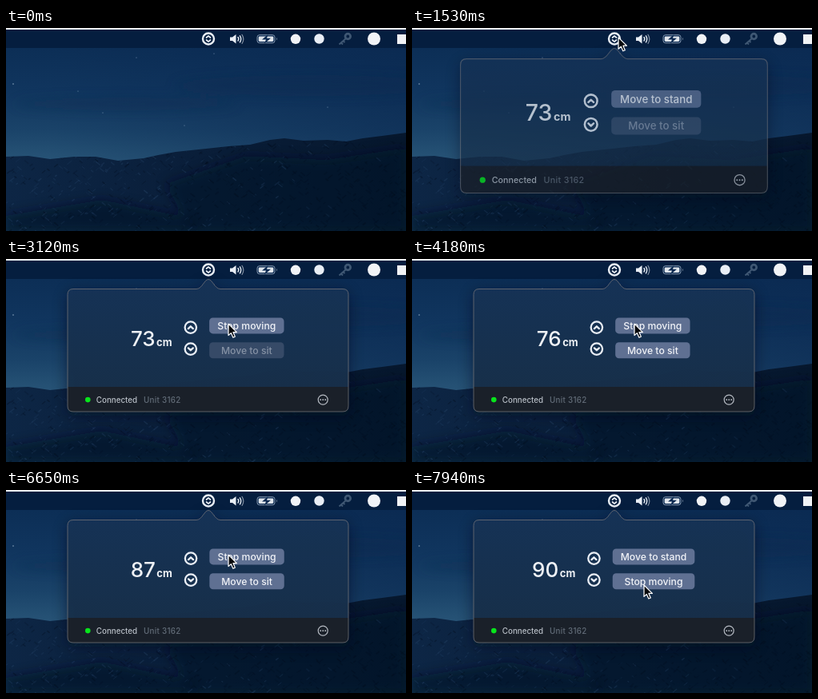
Write an HTML page that moves like this. It is 500x254 px and loops after 8000 ms.

```html
<!DOCTYPE html>
<html lang="en">
<head>
<meta charset="utf-8">
<title>Desk height control</title>
<style>
html, body { margin: 0; width: 100%; height: 100%; overflow: hidden; background: #071a35; }
svg { display: block; width: 500px; height: 254px; font-family: Inter, sans-serif; }
.line { fill: none; stroke: #e9eef5; stroke-linecap: round; stroke-linejoin: round; }
.label { font-size: 12.2px; font-weight: 500; text-anchor: middle; }
</style>
</head>
<body>
<svg viewBox="0 0 500 254">
  <defs>
    <linearGradient id="sky" x2="0" y2="1">
      <stop offset="0" stop-color="#0a2b52"/>
      <stop offset=".45" stop-color="#10355e"/>
      <stop offset=".75" stop-color="#1a4369"/>
      <stop offset="1" stop-color="#295678"/>
    </linearGradient>
    <linearGradient id="dusk">
      <stop offset=".1" stop-color="#0a2850" stop-opacity="0"/>
      <stop offset="1" stop-color="#0a2850" stop-opacity=".6"/>
    </linearGradient>
    <linearGradient id="hill">
      <stop offset="0" stop-color="#0d2645"/>
      <stop offset=".4" stop-color="#0a1f3b"/>
      <stop offset="1" stop-color="#06172d"/>
    </linearGradient>
    <linearGradient id="panel" x2="0" y2="1">
      <stop offset="0" stop-color="#163357"/>
      <stop offset="1" stop-color="#182f47"/>
    </linearGradient>
    <filter id="soft" x="-20%" y="-20%" width="140%" height="150%"><feGaussianBlur stdDeviation="9"/></filter>
    <filter id="haze" x="-20%" y="-80%" width="140%" height="260%"><feGaussianBlur stdDeviation="7"/></filter>
    <path id="ridge" d="M0 161L28 160 55 164 85 161 112 161 140 166 172 163 190 159 212 155 250 151 278 148 305 146 330 140 348 138 372 141 402 140 425 142 446 138 470 135 500 131V254H0Z"/>
    <clipPath id="land"><use href="#ridge"/></clipPath>
    <path id="shape" d="M84 37.5H238C245 37.5 248 25.5 253 25.5S261 37.5 268 37.5H421Q428 37.5 428 44.5V184Q428 191 421 191H84Q77 191 77 184V44.5Q77 37.5 84 37.5Z"/>
    <clipPath id="inside"><use href="#shape"/></clipPath>
  </defs>

  <rect width="500" height="170" fill="url(#sky)"/>
  <rect width="500" height="170" fill="url(#dusk)"/>
  <g filter="url(#haze)" fill="#0a2a50" opacity=".4">
    <ellipse cx="380" cy="72" rx="170" ry="13"/>
    <ellipse cx="150" cy="95" rx="140" ry="8"/>
  </g>
  <g id="stars" fill="#8fa8c2"></g>
  <use href="#ridge" fill="url(#hill)"/>
  <g clip-path="url(#land)">
    <g filter="url(#haze)" fill="#051326">
      <path d="M200 195L300 160 400 165 500 150V254H230Z" opacity=".55"/>
      <path d="M0 235L120 215 240 240V254H0Z" opacity=".6"/>
    </g>
    <g id="slopes" fill="none" stroke-linecap="round"></g>
  </g>
  <rect width="500" height="25" fill="#06214a"/>
  <rect width="500" height="25" fill="#041c38" opacity=".55"/>
  <rect width="500" height="2" fill="#eef0f2"/>

  <g id="menu">
    <circle class="line" cx="253" cy="13.5" r="7" stroke-width="2.4"/>
    <path class="line" d="M250.5 12L253 9.8 255.5 12M250.5 15L253 17.2 255.5 15" stroke-width="1.7"/>
    <path d="M280 11.5H283L287.5 8V19.5L283 16H280Z" fill="#e9eef5"/>
    <path class="line" d="M290 11.5Q291.6 13.8 290 16M292.4 9.8Q295 13.8 292.4 17.8" stroke-width="1.4"/>
    <path class="line" d="M295 8.3Q298.6 13.8 295 19.3" stroke-width="1.2" opacity=".55"/>
    <rect x="314" y="8.7" width="22" height="10" rx="2.8" fill="#0a2850" stroke="#8497ad"/>
    <rect x="315.7" y="10.4" width="18.6" height="6.6" rx="1.4" fill="#dfe5ec"/>
    <path d="M338 11.8Q339.8 13.7 338 15.6Z" fill="#8497ad"/>
    <path d="M327.5 8L320 14.4H325L323 19.5 331 12.8H326Z" fill="#0a2850"/>
    <circle cx="362" cy="13.8" r="6.2" fill="#f1f3f6"/>
    <circle cx="391.5" cy="13.5" r="6.2" fill="#e9eef5"/>
    <g fill="none" stroke="#3f5773" stroke-width="2">
      <circle cx="427.3" cy="10.5" r="3.3" stroke-width="2.8"/>
      <path d="M425 13L416.5 20.5M419 18.5L421 20.5M421.5 16.2L423.5 18"/>
    </g>
    <circle cx="460" cy="13.5" r="8" fill="#f1f3f6"/>
    <rect x="489" y="8" width="12" height="12" fill="#f1f3f6"/>
  </g>

  <g id="popup">
    <use href="#shape" y="5" fill="#020b1b" opacity=".55" filter="url(#soft)"/>
    <use href="#shape" fill="url(#panel)" fill-opacity=".96"/>
    <rect x="77" y="160" width="351" height="31" fill="#1a2029" clip-path="url(#inside)"/>
    <use href="#shape" fill="none" stroke="#77767a" stroke-opacity=".75"/>
    <g transform="translate(0 .6)">
      <text id="height" y="108" font-size="26" font-weight="500" fill="#eef1f5"></text>
      <g id="controls">
        <text x="-66" y="108" font-size="13" font-weight="700" fill="#eef1f5">cm</text>
        <g class="line" stroke-width="2.3">
          <circle cx="-23.3" cy="85" r="7.2"/><path d="M-26.3 86.5L-23.3 83.7-20.3 86.5"/>
          <circle cx="-23.3" cy="112" r="7.2"/><path d="M-26.3 110.8L-23.3 113.6-20.3 110.8"/>
        </g>
        <rect id="up" y="72.8" height="20" rx="4.5"/>
        <rect id="down" y="103.6" height="20" rx="4.5"/>
        <g class="label" fill="#f1f3f8">
          <text id="stand" y="87.2">Move to stand</text>
          <text id="stop" y="87.2">Stop moving</text>
          <text id="sit" y="118.1"></text>
        </g>
      </g>
      <circle cx="102.3" cy="175.5" r="3.3" fill="#08e51c"/>
      <g font-size="9.8" font-weight="500">
        <text x="112.8" y="179.2" fill="#b9bfc7">Connected</text>
        <text x="172" y="179.2" fill="#626c78" letter-spacing=".3">Unit 3162</text>
      </g>
      <circle class="line" cx="396.2" cy="175.5" r="6" stroke-width="1.2" opacity=".75"/>
      <path class="line" d="M393.2 175.5h.01M396.2 175.5h.01M399.2 175.5h.01" stroke-width="1.8" opacity=".85"/>
    </g>
  </g>
  <path id="cursor" d="M0 0V14.4L3.3 11.4 5.8 17 8.3 15.9 5.9 10.4H10.4Z" fill="#06080c" stroke="#fff" stroke-width="1.2" stroke-linejoin="round"/>
</svg>
<script>
const $ = id => document.getElementById(id);
const set = (id, attrs) => { for (const k in attrs) $(id).setAttribute(k, attrs[k]); };
const clamp = v => Math.max(0, Math.min(1, v));
const smooth = (a, b, t) => { const p = clamp((t - a) / (b - a)); return p * p * (3 - 2 * p); };

const LOOP = 8000, FPS = 17;
const CENTER = 251.7, GAP = 67.5, WIDE = 102.6, NARROW = 93.4;
// Times at which the height rises by one, starting from 73
const RISES = [3590, 3940, 4180, 4470, 4650, 4820, 5060, 5290, 5530, 5760,
  5940, 6180, 6410, 6650, 6880, 7120, 7300];
// Pointer stops: time, x, y
const POINTER = [[235, 351, 231], [880, 262, 9], [940, 261, 10.4], [1180, 258, 11.8],
  [1880, 258, 11.8], [2290, 283, 88], [2410, 278, 81.2], [7530, 278, 81.2], [7825, 290, 119]];

function buildScenery() {
  let seed = 11;
  const rnd = () => (seed = seed * 16807 % 2147483647) / 2147483647;
  $('stars').innerHTML = [[9, 70], [163, 37], [260, 32], [121, 106], [223, 122], [402, 99], [90, 79]]
    .map(([x, y], i) => `<circle cx="${x}" cy="${y}" r="${i ? .5 : .8}"/>`).join('');
  let marks = '';
  for (let i = 0; i < 900; i++) {
    const x = rnd() * 500, y = 140 + rnd() * 114, len = 1 + rnd() * 4;
    const light = rnd() < .6 - x / 900;
    const dir = rnd() < .5 ? 1 : -1;
    marks += `<path d="M${x} ${y}l${dir * len} ${len * .8}" stroke="${light ? '#29476b' : '#030d1c'}"
      stroke-width="${.8 + rnd()}" opacity="${.1 + rnd() * .3}"/>`;
  }
  $('slopes').innerHTML = marks;
}

function pointerAt(t) {
  let i = 0;
  while (i < POINTER.length - 2 && t >= POINTER[i + 1][0]) i++;
  const [t0, x0, y0] = POINTER[i], [t1, x1, y1] = POINTER[i + 1];
  const p = smooth(t0, t1, t);
  return [x0 + (x1 - x0) * p, y0 + (y1 - y0) * p];
}

function draw(t) {
  const open = clamp((t - 1382) / 265);
  const scale = 1 + .21 * (1 - open);
  set('popup', {
    opacity: Math.sqrt(open),
    transform: `translate(253 25) scale(${scale}) translate(-253 -25)`
  });

  const height = 73 + RISES.filter(r => t >= r - 5).length;
  const moving = smooth(2760, 3110, t) - smooth(7060, 7350, t);
  const width = WIDE + (NARROW - WIDE) * moving;
  $('height').textContent = height;
  const numWidth = $('height').getComputedTextLength();
  const left = CENTER - (numWidth + GAP + width) / 2;
  set('height', { x: left });
  set('controls', { transform: `translate(${left + numWidth + GAP})` });

  const pressUp = t > 2640 && t < 2760, pressDown = t > 7810 && t < 7930;
  const canSit = height > 73;
  set('up', { width, fill: pressUp ? '#74849f' : '#5f7092' });
  set('down', { width, fill: pressDown ? '#74849f' : canSit ? '#5f7092' : '#364a67' });
  set('stand', { x: width / 2, opacity: 1 - moving });
  set('stop', { x: width / 2, opacity: moving });
  set('sit', { x: width / 2, opacity: canSit ? 1 : .42 });
  $('sit').textContent = t > 7930 ? 'Stop moving' : 'Move to sit';

  set('cursor', { transform: `translate(${pointerAt(t)})`, opacity: t < 230 ? 0 : 1 });
}

function tick(now) {
  // The picture advances in steps of 1/17 s
  const step = Math.floor((now % LOOP + 5) * FPS / 1000);
  draw(step % (LOOP * FPS / 1000) * 1000 / FPS);
  requestAnimationFrame(tick);
}

buildScenery();
requestAnimationFrame(tick);
</script>
</body>
</html>
```
